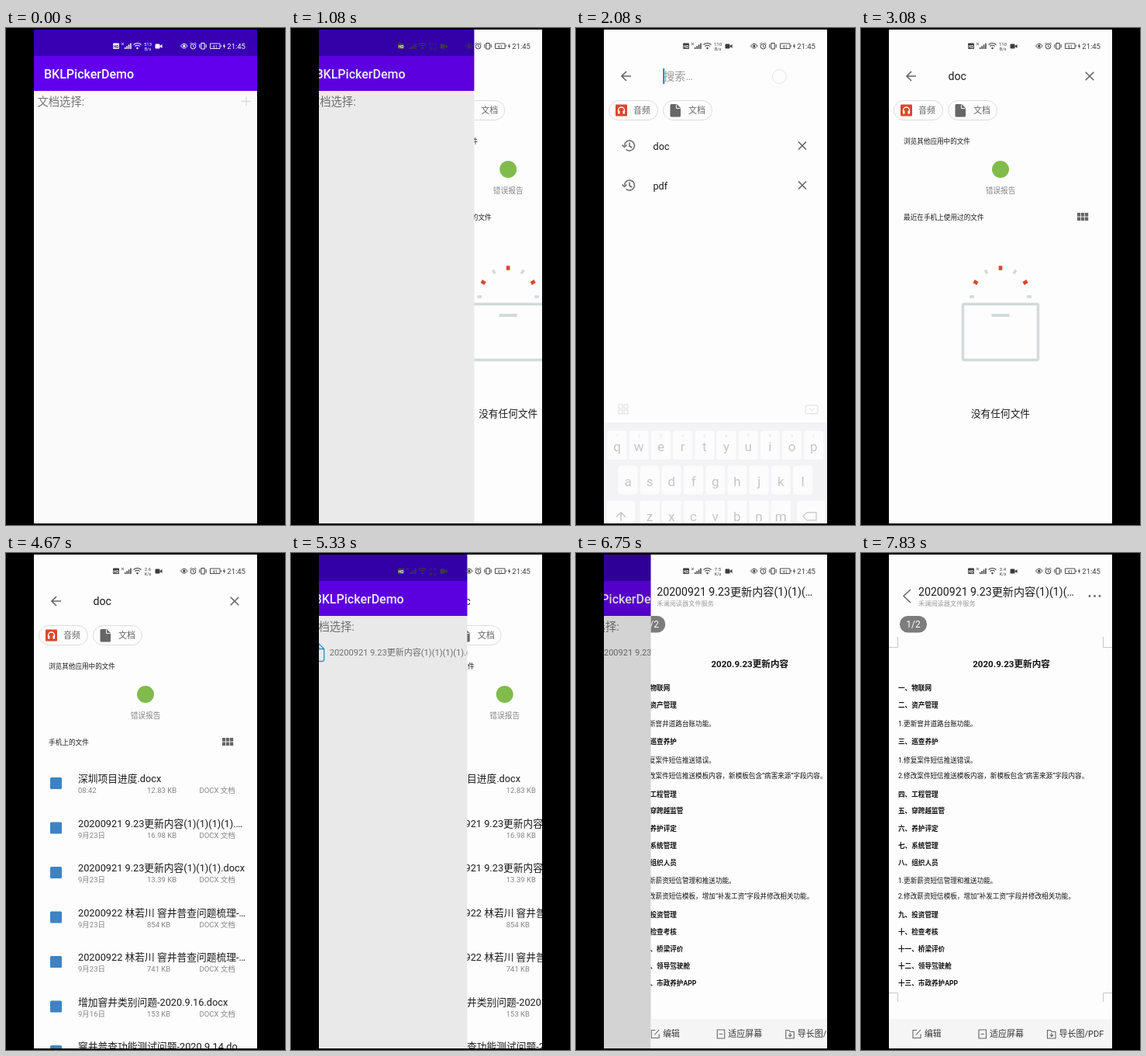
Recreate the animation shown at these times as an HTML page. Size 360 by 640 pixels, loop 8000 ms.

```html
<!DOCTYPE html>
<html lang="zh-CN">
<head>
<meta charset="utf-8">
<title>File picker</title>
<style>
html, body { margin: 0; width: 100%; height: 100%; overflow: hidden; background: #000; }
svg { display: block; width: 360px; height: 640px; font-family: Roboto, "Noto Sans CJK SC", "Noto Sans CJK", sans-serif; }
</style>
</head>
<body>
<svg id="stage" viewBox="0 0 360 640" xmlns="http://www.w3.org/2000/svg"></svg>
<script>
const LOOP = 8000, STEP = 1000 / 12;
const INK = '#1c1c1c', GREY = '#666', SOFT = '#858585', PALE = '#d3dada', FAINT = '#dcdcdc', ORANGE = '#d9482c', PAPER = '#fdfdfe';

// Markup helpers
const text = (x, y, size, str, fill = INK, more = '') =>
  `<text x="${x}" y="${y}" font-size="${size}" fill="${fill}" ${more}>${str}</text>`;
const rect = (x, y, w, h, fill, more = '') =>
  `<rect x="${x}" y="${y}" width="${w}" height="${h}" fill="${fill}" ${more}/>`;
const line = (d, color, width = 1.5, more = '') =>
  `<path d="${d}" fill="none" stroke="${color}" stroke-width="${width}" ${more}/>`;
const circle = (x, y, r, more) => `<circle cx="${x}" cy="${y}" r="${r}" ${more}/>`;
const cross = (x, y, r, color, width) =>
  line(`M${x - r} ${y - r}l${2 * r} ${2 * r}M${x + r} ${y - r}l${-2 * r} ${2 * r}`, color, width);
const group = (id, body, more = '') => `<g id="${id}" ${more}>${body}</g>`;
const MID = 'text-anchor="middle"', BOLD = 'font-weight="700"', MEDIUM = 'font-weight="500"';

function statusBar() {
  const c = 'currentColor';
  let s = rect(138, 19.5, 8, 7.5, c, 'rx="1"') +
    text(142, 25.6, 5, 'HD', 'var(--hole)', `${MID} ${BOLD}`) +
    line('M149 19l3 3M152 19l-3 3', c, .8);
  for (let i = 0; i < 4; i++) s += rect(153 + i * 2.4, 25 - i * 1.8, 1.5, 2 + i * 1.8, c);
  s += line('M164.5 21.5q5-4 10 0M166.3 23.6q3.2-2.6 6.4 0', c, 1.1) + circle(169.5, 26, 1.2, `fill="${c}"`);
  s += `<text id="speed" x="183" y="22.6" font-size="6" fill="${c}" ${MID}></text>`;
  s += `<text id="unit" x="183" y="29" font-size="5.6" fill="${c}" ${MID}></text>`;
  s += rect(192.5, 20.5, 6, 6, c, 'rx="1.2"') + `<path d="M198 23.5l3.5-2.5v5z" fill="${c}"/>`;
  s += line('M225.5 23.2q4.3-6 8.6 0q-4.3 6-8.6 0z', c, 1) + circle(229.8, 23.2, 1.6, `fill="${c}"`);
  s += circle(241.5, 23.6, 3.3, `fill="none" stroke="${c}"`) +
    line('M241.5 21.5v2.3l1.5 1M237.5 20.5l2-1.7M245.5 20.5l-2-1.7', c, .9);
  s += line('M251.8 19.5h4.4v7.5h-4.4zM249.8 21v4.5M258.2 21v4.5', c, 1);
  s += line('M263.5 20h12.5v6.5h-12.5zM277.3 22v2.5', c, .9) + text(269.8, 25.5, 6, '41', c, MID);
  s += `<path d="M282 19.5l-2.2 4.2h1.6l-.6 3.4 2.5-4.3h-1.7z" fill="${c}"/>`;
  return s + text(285.3, 26.8, 9.5, '21:45', c);
}

function homePage() {
  return rect(36, 2, 288, 34, '#3700b3') + rect(36, 36, 288, 45, '#6200ee') +
    rect(36, 81, 288, 557, '#fafafa') +
    text(49, 65, 16, 'BKLPickerDemo', '#fff', MEDIUM) +
    text(40.5, 100, 14.3, '文档选择:', '#757575') +
    line('M304 94.5h12M310 88.5v12', FAINT, 1.3) +
    group('picked',
      line('M41.5 116.5h13.5l7 7v13.5q0 2.5-2.5 2.5h-18q-2.5 0-2.5-2.5v-18q0-2.5 2.5-2.5zM55 116.5v7h7', '#2a9bd0', 1.3) +
      rect(46, 124.5, 9, 9, '#2a9bd0') +
      text(69, 132, 11.05, '20200921 9.23更新内容(1)(1)(1)(1).docx', '#757575') +
      circle(309.5, 127.5, 7.5, 'fill="none" stroke="#c4c4c4" stroke-width="1.2"') +
      cross(309.5, 127.5, 4, '#c4c4c4', 1.2)) +
    group('dim', rect(36, 2, 288, 636, '#000'));
}

function chips() {
  const pill = x => rect(x, 93.5, 63, 25, 'none', `rx="12.5" stroke="${FAINT}"`);
  return pill(42.5) + pill(112.5) +
    rect(51, 98.5, 15, 15, ORANGE, 'rx="1"') +
    line('M54.5 108v-2a4 4 0 0 1 8 0v2', '#fff', 1.3) +
    rect(54, 106.5, 2.5, 4, '#fff') + rect(60.5, 106.5, 2.5, 4, '#fff') +
    text(74, 110, 11, '音频', GREY) +
    `<path d="M123 98h7l5 5v10q0 1.5-1.5 1.5h-10.5q-1.5 0-1.5-1.5v-13.5q0-1.5 1.5-1.5z" fill="${GREY}"/>` +
    line('M129.5 98.5v5h5', PAPER, 1) +
    text(145, 110, 11, '文档', GREY);
}

function emptyState() {
  let s = '';
  for (let i = 0; i <= 6; i++) {
    const hot = i % 2 === 1, w = hot ? 4.6 : 3.6;
    s += rect(180 - w / 2, 306.2, w, 5.6, hot ? ORANGE : PALE, `transform="rotate(${i * 30 - 90} 180 346)"`);
  }
  return s + rect(131.5, 355.5, 97, 72, 'none', `rx="2" stroke="${PALE}" stroke-width="3.5"`) +
    rect(168.5, 368, 23, 4, PALE) + text(180, 500.5, 12.7, '没有任何文件', INK, MID);
}

const FILES = [
  ['深圳项目进度.docx', '08:42', '12.83 KB'],
  ['20200921 9.23更新内容(1)(1)(1)(1).…', '9月23日', '16.98 KB'],
  ['20200921 9.23更新内容(1)(1)(1).docx', '9月23日', '13.39 KB'],
  ['20200922 林若川 窨井普查问题梳理-…', '9月23日', '854 KB'],
  ['20200922 林若川 窨井普查问题梳理-…', '9月23日', '741 KB'],
  ['增加窨井类别问题-2020.9.16.docx', '9月16日', '153 KB'],
  ['窨井普查功能测试问题-2020.9.14.do…', '9月14日', '148 KB']
];

function fileList() {
  return FILES.map(([name, date, size], i) => {
    const y = 295 + i * 57.5;
    return rect(57, y - 6, 15, 15, '#3d83c4', 'rx="1.5"') + text(93, y, 12.75, name) +
      text(93, y + 14, 9.5, date, SOFT) + text(182, y + 14, 9.5, size, SOFT) +
      text(249.5, y + 14, 9.5, 'DOCX 文档', SOFT);
  }).join('');
}

function historyRow(y, word) {
  return line(`M62.5 ${y}a6.5 6.5 0 1 1 2 4.7M59.5 ${y - 1}l3 3 3-3M69 ${y - 4}v4.5l3.3 2`, GREY, 1.5) +
    text(99.5, y + 5, 12.7, word) + cross(292, y, 5, GREY, 1.6);
}

function keyboard() {
  const mark = '#a8a8a8';
  let s = rect(36, 428, 288, 34, PAPER) + rect(36, 462, 288, 290, '#e2e4e6');
  for (const [x, y] of [[55, 439], [62, 439], [55, 446], [62, 446]]) s += rect(x, y, 5, 5, 'none', `stroke="${mark}"`);
  s += rect(296, 440, 16, 11, 'none', `rx="2" stroke="${mark}"`) + line('M301 444l3 3 3-3', mark, 1);
  const key = (x, y, w) => rect(x - w / 2, y - 20, w, 37, '#fcfcfc', 'rx="3"');
  ['qwertyuiop', 'asdfghjkl', 'zxcvbnm'].forEach((row, r) => {
    const y = 493 + r * 45, x0 = [53, 67, 95][r];
    [...row].forEach((ch, i) => {
      const x = x0 + i * 28.2;
      s += key(x, y, 25) + text(x, y + 6, 17, ch, GREY, MID);
      if (!r) s += text(x, y - 12, 6, (i + 1) % 10, mark, MID);
    });
  });
  s += key(58, 583, 36) + line('M52 584l6-6 6 6M58 578v11', GREY) +
    key(303, 583, 36) + line('M298 578h12v10h-12l-5-5z', GREY, 1.2);
  return s + key(60, 628, 40) + key(180, 628, 130) + key(300, 628, 40);
}

function pickerPage() {
  return rect(36, 2, 288, 636, PAPER) + chips() +
    group('recentBar',
      line('M58 57.5h14M58 62h14M58 66.5h14', GREY) + text(94, 67, 14.2, '最近', INK) +
      circle(261, 61, 4.5, `fill="none" stroke="${GREY}" stroke-width="1.6"`) + line('M264.5 64.5l4.5 4.5', GREY, 1.7) +
      [57, 62, 67].map(y => circle(295, y, 1.4, `fill="${GREY}"`)).join('')) +
    group('backArrow', line('M71 62h-12M65 56l-6 6 6 6', GREY, 1.6)) +
    group('history',
      text(113, 67, 14.2, '搜索…', '#999') + rect(112.2, 52, 2, 20, '#2187a8') +
      historyRow(151.5, 'doc') + historyRow(202.5, 'pdf')) +
    group('ripple', circle(262.5, 62.5, 9, 'fill="none" stroke="#e6e6e6"')) +
    group('query', text(112.5, 67, 14.2, 'doc') + cross(295, 62, 5.3, GREY, 1.6)) +
    group('content',
      text(55, 148.6, 8.6, '浏览其他应用中的文件', INK, MEDIUM) +
      circle(180, 182, 11, 'fill="#80bb4c"') + text(180, 212.5, 9.7, '错误报告', SOFT, MID) +
      `<text id="section" x="55" y="247" font-size="8.65" fill="${INK}" ${MEDIUM}></text>` +
      [0, 1, 2, 3, 4, 5].map(i => rect(279 + i % 3 * 5, i < 3 ? 238 : 243.5, 4.2, 4.6, GREY)).join('') +
      group('empty', emptyState()) + group('list', fileList())) +
    group('keys', keyboard());
}

// Preview lines: centre y and text; numbered items are regular, headings bold
const LINES = [
  [174, '一、物联网'], [196, '二、资产管理'], [220, '1.更新窨井道路台账功能。'], [243, '三、巡查养护'],
  [267, '1.修复案件短信推送错误。'], [287, '2.修改案件短信推送模板内容，新模板包含“病害来源”字段内容。'],
  [311, '四、工程管理'], [332, '五、穿跨越监管'], [355, '六、养护评定'], [377, '七、系统管理'], [399, '八、组织人员'],
  [422, '1.更新薪资短信管理和推送功能。'], [442, '2.修改薪资短信模板，增加“补发工资”字段并修改相关功能。'],
  [466, '九、投资管理'], [488, '十、检查考核'], [510, '十一、桥梁评价'], [532, '十二、领导驾驶舱'], [554, '十三、市政养护APP']
];

function previewPage() {
  return rect(36, 2, 288, 636, PAPER) +
    line('M64 47l-9 8.5 9 8.5', GREY, 1.5) +
    text(74, 54.5, 14.15, '20200921 9.23更新内容(1)(1)(…') +
    text(74, 68, 8.2, '禾澜阅读器文件服务', '#9c9c9c') +
    [295, 301.5, 308].map(x => circle(x, 55.5, 1.4, `fill="${GREY}"`)).join('') +
    line('M36 121.5h11.5v-13.5M324 121.5h-11.5v-13.5M36 566.5h11.5v11.5M324 566.5h-11.5v11.5', '#c8c8c8', 1) +
    rect(50, 81, 35, 21.5, '#7c7c7c', 'rx="10.5"') + text(67.5, 96, 12, '1/2', '#fff', MID) +
    text(194, 147, 11.6, '2020.9.23更新内容', '#111', MID + ' ' + BOLD) +
    LINES.map(([y, s]) => text(48, y + 3.2, 8.6, s, '#111', /^\d/.test(s) ? '' : BOLD)).join('') +
    rect(36, 600, 288, 38, '#f5f5f5') +
    line('M72 614.5h-5v10h10v-5M71 620.5l6-6.5', GREY, 1.1) + text(82, 623, 10.8, '编辑', '#333') +
    line('M152 614h9.5v11h-9.5zM154.5 619.5h4.5', GREY, 1.1) + text(166, 623, 11, '适应屏幕', '#333') +
    line('M240.5 614.5h4l1.5 2h5v8.5h-10.5zM246 618v4.5M244 620.5l2 2 2-2', GREY, 1.1) +
    text(255.5, 623, 11, '导长图/PDF', '#333');
}

document.getElementById('stage').innerHTML =
  `<defs><clipPath id="win"><rect x="36" y="2" width="288" height="636"/></clipPath>
  <clipPath id="reveal"><rect id="edge" x="324" y="2" width="288" height="636"/></clipPath></defs>` +
  rect(0, 0, 360, 640, '#000') +
  `<g clip-path="url(#win)">${group('home', homePage())}
  <g clip-path="url(#reveal)">${group('page', group('picker', pickerPage()) + group('preview', previewPage()))}</g>
  ${group('status', statusBar())}</g>`;

const el = {};
document.querySelectorAll('[id]').forEach(n => el[n.id] = n);
const show = (id, a) => {
  el[id].style.display = a > 0 ? '' : 'none';
  el[id].style.opacity = Math.min(1, a);
};
const move = (id, x, y = 0) => el[id].setAttribute('transform', `translate(${x.toFixed(2)} ${y.toFixed(2)})`);
const ramp = (t, from, length) => Math.max(0, Math.min(1, (t - from) / length));

// cubic-bezier(.4, 0, .2, 1)
function ease(x) {
  let lo = 0, hi = 1, s = .5;
  for (let i = 0; i < 24; i++) {
    s = (lo + hi) / 2;
    const v = 1.2 * (1 - s) ** 2 * s + .6 * (1 - s) * s * s + s ** 3;
    if (v < x) lo = s; else hi = s;
  }
  return s * s * (3 - 2 * s);
}

const SPEEDS = [[0, '513', 'B/s'], [1580, '110', 'B/s'], [4160, '2.6', 'K/s'], [5160, '7.5', 'K/s'], [7410, '3.1', 'K/s'], [7820, '3.4', 'K/s']];

function draw(t) {
  // Window slide with parallax: edge 100%, new page 50%, old page 20%
  const p = t < 5000 ? ease(ramp(t, 945, 500))
    : t < 6300 ? 1 - ease(ramp(t, 5120, 500))
    : ease(ramp(t, 6530, 430));
  const open = p > .001;
  el.edge.setAttribute('x', 36 + 288 * (1 - p));
  move('page', 144 * (1 - p));
  move('home', -57.6 * p);
  show('dim', p * .2);
  el.page.style.display = open ? '' : 'none';
  el.status.style.color = open ? '#3c3c3c' : '#fff';
  el.status.style.setProperty('--hole', open ? PAPER : '#3700b3');

  const typing = t > 1990 && t < 2660, searched = t >= 2660;
  show('picked', t > 5000);
  show('preview', t > 6300);
  show('picker', t < 6300);
  show('recentBar', t < 1990);
  show('backArrow', t > 1990);
  show('history', typing);
  show('ripple', t > 1820 && t < 2150);
  show('query', searched);
  show('content', !typing);

  const loaded = ramp(t, 4090, 330);
  el.section.textContent = loaded > 0 ? '手机上的文件' : '最近在手机上使用过的文件';
  show('empty', 1 - loaded);
  show('list', loaded);

  const up = t < 2500 ? ramp(t, 1960, 205) : 1 - ramp(t, 2620, 250);
  show('keys', up * up);
  move('keys', 0, 115 * (1 - up));

  const [, speed, unit] = SPEEDS.filter(s => s[0] <= t).pop();
  el.speed.textContent = speed;
  el.unit.textContent = unit;
}

const start = performance.now();
function tick() {
  const t = (performance.now() - start) % LOOP;
  draw(Math.floor((t + 4) / STEP) % 96 * STEP);
  requestAnimationFrame(tick);
}
tick();
</script>
</body>
</html>
```
